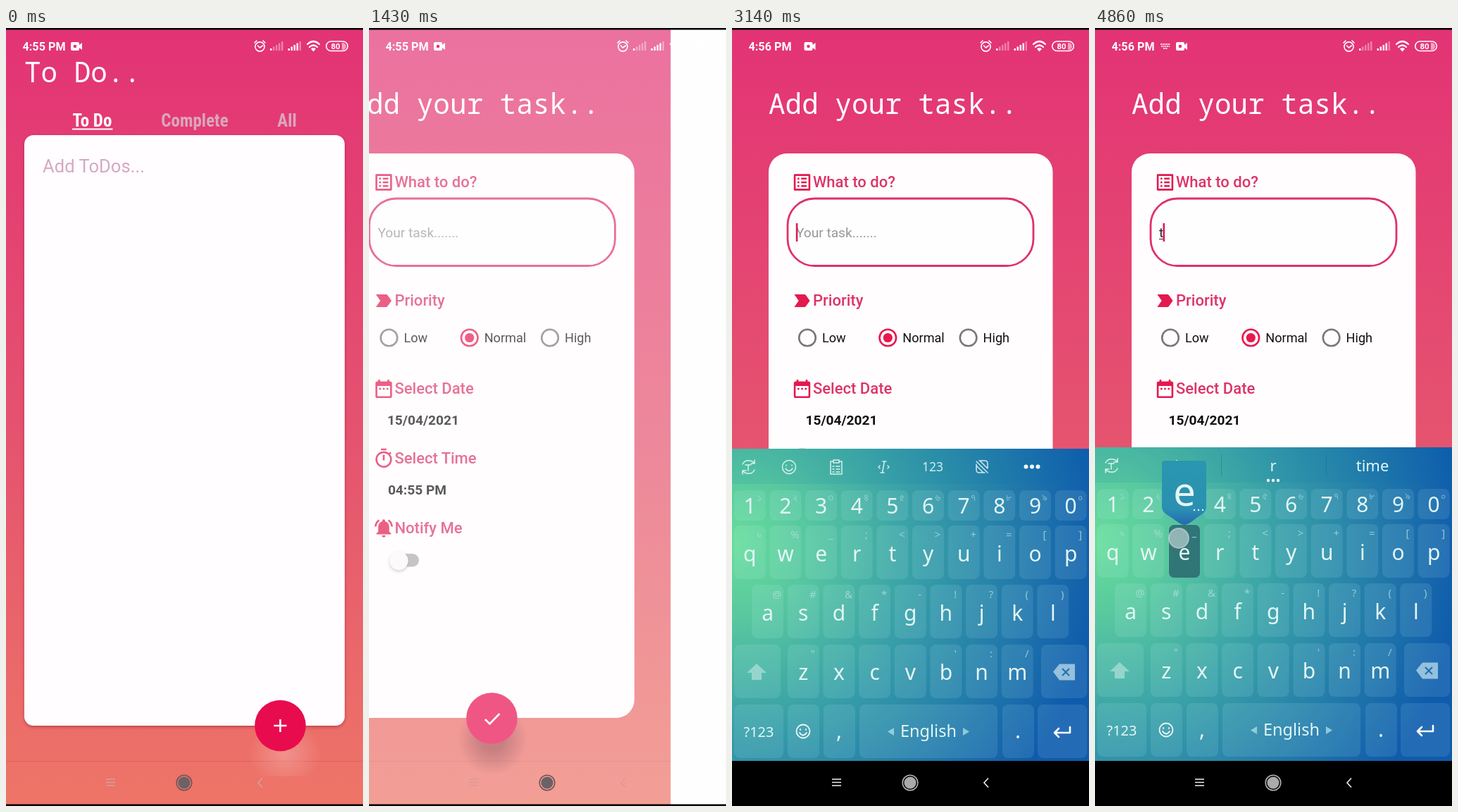
Animation, 507 px wide and 1104 px high, one loop 5.01 s. Source, as an HTML page:

```html
<!DOCTYPE html>
<html lang="en">
<head>
<meta charset="utf-8">
<title>To-do app</title>
<style>
html, body { margin: 0; width: 100%; height: 100%; overflow: hidden; background: #000; }
svg { display: block; width: 100vw; height: 100vh; font-family: Roboto, sans-serif; }
text { white-space: pre; }
.mid { text-anchor: middle; }
.title { font: 39.3px "Noto Sans Mono", monospace; fill: #fff; }
.tab { font: 700 25px "Roboto Condensed", Roboto, sans-serif; font-stretch: 75%; text-anchor: middle; fill: #d9a6bd; }
.label { font-size: 22px; font-weight: 500; fill: #dc3468; }
.value { font-size: 19.1px; font-weight: 700; fill: #111; }
.option { font-size: 18.1px; fill: #111; }
.hint { font-size: 19.1px; }
.status { fill: #fff; stroke: none; }
.line { fill: none; stroke: #fff; stroke-linecap: round; stroke-linejoin: round; }
.kb text { font-family: "Noto Sans", sans-serif; fill: #e3f6f5; }
.kb .cap { font-size: 30px; text-anchor: middle; }
.kb .alt { font-size: 15px; text-anchor: middle; fill: #b5e2df; opacity: .75; }
.kb .word { font-size: 22px; text-anchor: middle; }
</style>
</head>
<body>
<svg viewBox="0 0 507 1104" preserveAspectRatio="none">
  <defs>
    <linearGradient id="sky" x2="0" y2="1">
      <stop stop-color="#e33375"/><stop offset=".54" stop-color="#e5546f"/><stop offset="1" stop-color="#ee7567"/>
    </linearGradient>
    <radialGradient id="sea" gradientUnits="userSpaceOnUse" cx="0" cy="730" r="525">
      <stop stop-color="#68dd9b"/><stop offset=".2" stop-color="#58c89f"/>
      <stop offset=".5" stop-color="#389fa8"/><stop offset="1" stop-color="#0f5bac"/>
    </radialGradient>
    <linearGradient id="bubble" x2="0" y2="1">
      <stop stop-color="#2a97af"/><stop offset=".75" stop-color="#2a90b2"/><stop offset="1" stop-color="#2569ae"/>
    </linearGradient>
    <radialGradient id="glow"><stop stop-color="#fff" stop-opacity=".24"/><stop offset="1" stop-color="#fff" stop-opacity="0"/></radialGradient>
    <radialGradient id="shade"><stop offset=".3" stop-color="#5a1024" stop-opacity=".42"/><stop offset="1" stop-color="#5a1024" stop-opacity="0"/></radialGradient>
    <filter id="soft" x="-50%" y="-50%" width="200%" height="200%"><feGaussianBlur stdDeviation="2"/></filter>
    <clipPath id="aboveNav"><rect width="507" height="1062"/></clipPath>
    <g id="back">
      <rect width="507" height="1104" fill="url(#sky)"/>
      <path d="M0 1040.5H507" stroke="#b0404f" stroke-opacity=".3"/>
    </g>
    <path id="camera" d="M2 20h8q2 0 2 2v2l4-3v10l-4-3v2q0 2-2 2H2q-2 0-2-2v-8q0-2 2-2z"/>
  </defs>

  <rect width="507" height="1104" fill="#fffefe"/>

  <g id="list">
    <use href="#back"/>
    <text class="title" x="26" y="77">To Do..</text>
    <text class="tab" x="122.5" y="140" style="fill:#fff">To Do</text>
    <path d="M94 143.5H151.500" stroke="#fff" stroke-width="2"/>
    <text class="tab" x="268" y="140">Complete</text>
    <text class="tab" x="399" y="140">All</text>
    <rect x="26" y="154" width="455" height="838" rx="13" fill="#8a2038" opacity=".5" filter="url(#soft)"/>
    <rect x="26" y="152" width="455" height="838" rx="13" fill="#fffdff"/>
    <text x="52" y="205" font-size="25.6" fill="#d5a9c0">Add ToDos...</text>
    <ellipse cx="396" cy="1030" rx="52" ry="48" fill="url(#glow)" clip-path="url(#aboveNav)"/>
    <circle id="add" cx="389.500" cy="990" r="36.300"/>
    <path d="M380.500 990h18M389.500 981v18" stroke="#fff" stroke-width="2.600"/>
  </g>

  <g id="form">
    <use href="#back"/>
    <text class="title" x="52" y="122">Add your task..</text>
    <rect x="52" y="178" width="403.500" height="801" rx="26" fill="#fffdfe"/>
    <g id="sections"></g>
    <rect x="79" y="242" width="349" height="95.500" rx="38" fill="#fffefe" stroke="#df3168" stroke-width="2.800"/>
    <text id="entry" class="hint" x="91" y="297"></text>
    <path id="under" d="M91 299.500h6" stroke="#222"/>
    <rect id="caret" y="277" width="2.600" height="26" fill="#d81f56"/>
    <g id="options"></g>
    <text class="value" x="104.500" y="563">15/04/2021</text>
    <text class="value" x="105.500" y="662">04:55 PM</text>
    <rect x="111" y="746" width="38.500" height="18.500" rx="9.200" fill="#b0abad"/>
    <circle cx="121" cy="758" r="13" fill="#777" opacity=".5" filter="url(#soft)"/>
    <circle cx="121" cy="756" r="13.200" fill="#fdf9fb"/>
    <ellipse cx="254" cy="1010" rx="50" ry="50" fill="url(#shade)"/>
    <circle cx="253" cy="979.500" r="36.300" fill="#e80c4e"/>
    <path class="line" d="M243.500 981l6.500 6.500L264 973" stroke-width="2.600" style="stroke-linecap:butt;stroke-linejoin:miter"/>
  </g>

  <g id="board" class="kb"></g>

  <g class="status">
    <text id="clock" x="23.500" y="31.500" font-size="16.200" font-weight="600"></text>
    <path id="keysIcon" d="M93 23h14M94 26h12M97 29h6" stroke="#fff" stroke-width="2" stroke-dasharray="2 .7" opacity=".8"/>
    <g id="rec"><use href="#camera"/><circle cx="6" cy="26" r="2.300" fill="#e33375"/></g>
    <g class="line" stroke-width="1.600">
      <circle cx="360.500" cy="26.500" r="6.600"/>
      <path d="M357.500 25l3 3 4-3M353 21l3-3M368 21l-3-3"/>
      <rect x="454.800" y="19" width="30.500" height="13.500" rx="6.700"/>
      <path d="M428 23q8.500-8 17 0M431 27q5.500-5 11 0" stroke-width="2.200"/>
    </g>
    <path d="M433 29.500q3.500-3 7 0l-3.500 4z"/>
    <path d="M477 21h2q4 1 4 5t-4 5h-2z" opacity=".55"/>
    <text class="mid" x="468" y="30" font-size="11.500" font-weight="700">80</text>
    <g id="signal"></g>
  </g>

  <g id="nav">
    <rect id="navBack" y="1040" width="507" height="64"/>
    <path id="menu" d="M142 1066h13M142 1070.500h13M142 1075h13" stroke-width="1.500"/>
    <circle id="ring" cx="253" cy="1071" r="10.800" fill="none" stroke-width="1.500"/>
    <circle id="home" cx="253" cy="1071" r="8.600"/>
    <path id="prev" d="M364 1064.500l-6 6.500 6 6.500" fill="none" stroke-width="1.600"/>
  </g>
  <path d="M0 1.300H507M0 1102.700H507" stroke="#000" stroke-width="2.600"/>
  <circle id="touch" r="14" fill="#fff" fill-opacity=".46" stroke="#d9d4e4" stroke-opacity=".6" stroke-width="2"/>
</svg>

<script>
const $ = id => document.getElementById(id);
const show = (id, on) => $(id).style.display = on ? '' : 'none';
const attr = (id, map) => { for (const k in map) $(id).setAttribute(k, map[k]); };
const text = (cls, x, y, s, extra = '') => `<text class="${cls}" x="${x}" y="${y}" ${extra}>${s.replace(/&/g, '&amp;').replace(/</g, '&lt;')}</text>`;

// Form headings with 24-unit icons
const sections = [
  ['What to do?', 219, 'M19 5v14H5V5h14m1-2H4q-1 0-1 1v16q0 1 1 1h16q1 0 1-1V4q0-1-1-1zM11 7h6v2h-6zm0 4h6v2h-6zm0 4h6v2h-6zM7 7h2v2H7zm0 4h2v2H7zm0 4h2v2H7z'],
  ['Priority', 387, 'M3.500 19h11q1 0 1.600-.8L20.500 12 16.100 5.800Q15.500 5 14.500 5h-11l4.800 7z'],
  ['Select Date', 512, 'M9 11H7v2h2zm4 0h-2v2h2zm4 0h-2v2h2zm2-7h-1V2h-2v2H8V2H6v2H5q-2 0-2 2v14q0 2 2 2h14q2 0 2-2V6q0-2-2-2zm0 16H5V9h14z'],
  ['Select Time', 611, 'M15 1H9v2h6zm-4 13h2V8h-2zm8-6.600L20.500 6 19 4.600 17.600 6A9 9 0 1 0 19 7.400zM12 20a7 7 0 1 1 0-14 7 7 0 0 1 0 14z'],
  ['Notify Me', 709.500, 'M7.600 4.100L6.200 2.700Q2.300 5.700 2 10.500h2q.3-4 3.600-6.400zM20 10.500h2q-.3-4.800-4.200-7.800l-1.400 1.400q3.300 2.400 3.600 6.400zM18 11q0-5-4.500-6.300V4a1.500 1.500 0 0 0-3 0v.7Q6 6 6 11v5l-2 2v1h16v-1l-2-2zM12 22q2 0 2-2h-4q0 2 2 2z']
];
$('sections').innerHTML = sections.map(([name, y, d]) =>
  `<path transform="translate(83.900 ${y - 15.600}) scale(1.300)" d="${d}" fill="#e3194f" fill-rule="evenodd"/>` +
  text('label', 115, y + 7.400, name)).join('');

$('options').innerHTML = ['Low', 'Normal', 'High'].map((name, i) => {
  const x = 107 + i * 114.300, on = i === 1;
  return `<circle cx="${x}" cy="439.500" r="11.800" fill="none" stroke="${on ? '#e8174f' : '#7c757a'}" stroke-width="2.600"/>` +
    (on ? `<circle cx="${x}" cy="439.500" r="6.600" fill="#e8174f"/>` : '') + text('option', x + 21, 446, name);
}).join('');

$('signal').innerHTML = [[375, 1], [400.500, 4]].map(([x, lit]) => [0, 1, 2, 3, 4].map(i =>
  `<rect x="${x + i * 4}" y="${29 - i * 2.500}" width="2.500" height="${3 + i * 2.500}" opacity="${i < lit ? .95 : .38}"/>`).join('')).join('');

// Keyboard
const PITCH = 50.650;
const key = (x, y, w, h = 76) => `<rect x="${x}" y="${y}" width="${w}" height="${h}" rx="8" fill="#d8fbff" fill-opacity=".1"/>`;
const row = (keys, alts, x0, top, h, base, altBase) => [...keys].map((c, i) => {
  const x = x0 + i * PITCH, a = alts[i];
  return key(x - 22.500, top, 45, h) + text('cap', x, base, c) +
    (a && a !== ' ' ? text('alt', x + 13.500, altBase, a) : '');
}).join('');
const smile = (x, y, r) => `<circle cx="${x}" cy="${y}" r="${r}"/><path d="M${x - 4} ${y - 3}v1M${x + 4} ${y - 3}v1M${x - 5} ${y + 2}q5 7 10 0"/>`;
const dots = (x, y, r, gap) => [-1, 0, 1].map(i => `<circle cx="${x + i * gap}" cy="${y}" r="${r}" fill="#eefafa"/>`).join('');

$('board').innerHTML = `
  <rect y="595" width="507" height="447" fill="url(#sea)"/>
  <rect y="595" width="507" height="50" fill="#0870a8" opacity=".1"/>
  <g class="line" stroke-width="1.500" opacity=".8">
    <path d="M15 617q4-8 14-4l3 3m0-5v5h-5M32 625q-4 8-14 4l-3-3m0 5v-5h5M19 618h8m-4 0v8"/></g>
  <g id="tools"><g class="line" stroke-width="1.500" opacity=".8">
    ${smile(81, 621, 9.500)}
    <path d="M144 613h-4v18h16v-18h-4m-8-2h8v4h-8zM143 620h2m3 0h5m-10 4h2m3 0h5m-10 4h2m3 0h5"/>
    <path d="M214 613h5m-2.500 0l-3 16m-2.500 0h5M210 619l-2 2 2 2M221 619l2 2-2 2"/>
    <path d="M347 613l16 16M351 612h8q4 0 4 4v7M347 617v8q0 4 4 4h8M352 612l11 11M347 619l10 10"/></g>
    ${text('mid', 285, 627, '123', 'font-size="17.500" opacity=".9"')}${dots(426, 620.500, 3, 8.500)}</g>
  <g id="words">
    <path d="M179.500 605v31M328.500 605v31" stroke="#12627f" stroke-opacity=".35"/>
    ${text('word', 122, 629, 'the')}${text('word', 253, 629, 'r')}${text('word', 394, 629, 'time')}${dots(253, 642, 2.200, 7)}</g>
  ${row('1234567890', '১২৩৪৫৬৭৮৯০', 25.300, 654, 43, 687, 669)}
  ${row('qwertyuiop', '৳%_;<>+=[]', 25.300, 704, 76, 755, 722)}
  ${row('asdfghjkl', '@#&*-!?()', 50.600, 788, 76, 839, 807)}
  ${row('zxcvbnm', '"   \':/', 101.300, 873, 76, 923, 891)}
  ${key(3, 873, 66)}${key(439, 873, 65)}${key(3, 958, 70)}${key(79, 958, 45)}${key(130, 958, 45)}
  ${key(181, 958, 196)}${key(384, 958, 45)}${key(434, 958, 70)}
  <path d="M35 900l14 13h-7v10H28v-10h-7z" fill="#a5dcd4" opacity=".8"/>
  <path d="M456 911.500l9-11h22v23h-22z" fill="#a9cfe4" opacity=".85"/>
  <path d="M469 907l10 10m0-10l-10 10" stroke="#2173ae" stroke-width="2.200"/>
  ${text('mid', 38, 1004, '?123', 'font-size="20"')}
  <g class="line" stroke-width="1.800" opacity=".9">${smile(101, 996, 9.500)}</g>
  ${text('cap', 152, 1006, ',')}${text('cap', 406, 1006, '.')}
  ${text('mid', 279, 1004, 'English', 'font-size="23.500" font-weight="500"')}
  <path d="M230 991v11l-9-5.500zM328 991v11l9-5.500z" fill="#a9dbe0" opacity=".8"/>
  <path class="line" d="M480 990v8h-22m6-6l-6 6 6 6" stroke-width="2.600"/>
  <g id="press">
    <rect x="-22" y="705" width="44" height="75" rx="7" fill="#27646c" opacity=".82"/>
    <text id="pressCap" class="cap" x="0" y="755"></text>${text('alt', 14, 727, '–')}
    <path d="M-32 618q0-4 4-4h55q4 0 4 4v62q0 5-5 9l-18 13q-8 6-16 0l-19-13q-5-4-5-9z" fill="url(#bubble)"/>
    <text id="pressBig" class="mid" x="0" y="678" font-size="56"></text>${dots(20, 684, 1.200, 6)}
  </g>`;

const steps = [
  { at: 0, press: 0, slide: 0, touch: null, caret: false, hint: '#9a979a', typed: '', kb: null, clock: '4:55 PM', rec: 92, keysIcon: false, key: '' },
  { at: 1000, press: .45, touch: [373, 983] },
  { at: 1140, press: 1 },
  { at: 1290, slide: .18, touch: null },
  { at: 1430, slide: .69 },
  { at: 1570, slide: 1 },
  { at: 2860, touch: [300, 296], caret: true, hint: '#828082' },
  { at: 3000, touch: null, kb: 130, hint: '#98969a' },
  { at: 3140, kb: 2, clock: '4:56 PM', rec: 102.500 },
  { at: 3290, kb: 0, rec: 115, keysIcon: true },
  { at: 3430, caret: false },
  { at: 3860, caret: true },
  { at: 4430, caret: false, key: 't', keyX: 228, touch: [226, 735] },
  { at: 4570, caret: true, typed: 't', key: '', touch: null },
  { at: 4860, key: 'e', keyX: 127, touch: [119, 724] }
];
const LOOP = 5010;

function draw(s) {
  const p = s.slide, kb = s.kb !== null;
  show('list', p < .5);
  attr('list', { transform: `translate(${253.500 * p})`, opacity: 1 - p });
  show('form', p > 0);
  attr('form', { transform: `translate(${253.500 * (p - 1)})`, opacity: p });
  attr('add', { fill: `rgb(${232 - 56 * s.press},${12 - 2 * s.press},${78 - 13 * s.press})` });

  $('entry').textContent = s.typed || 'Your task.......';
  attr('entry', { fill: s.typed ? '#222' : s.hint });
  show('under', s.typed);
  show('caret', s.caret);
  attr('caret', { x: s.typed ? 96.500 : 90.800 });

  show('board', kb);
  attr('board', { transform: `translate(0 ${s.kb || 0})` });
  show('tools', !s.typed);
  show('words', s.typed);
  show('press', s.key);
  attr('press', { transform: `translate(${s.keyX || 0})` });
  $('pressCap').textContent = $('pressBig').textContent = s.key;

  $('clock').textContent = s.clock;
  show('keysIcon', s.keysIcon);
  attr('rec', { transform: `translate(${s.rec})` });

  const faint = p > 0 ? '#d99a98' : '#cfa0a3';
  show('navBack', kb);
  attr('menu', { stroke: kb ? '#eee' : faint });
  attr('prev', { stroke: kb ? '#eee' : faint });
  attr('ring', { stroke: kb ? '#b5b5b5' : '#6b5558' });
  attr('home', { fill: kb ? '#aaa' : '#6a6264' });

  show('touch', s.touch);
  if (s.touch) attr('touch', { cx: s.touch[0], cy: s.touch[1] });
}

const start = performance.now();
let last = -1;
function tick() {
  const t = (performance.now() - start) % LOOP;
  const n = steps.filter(s => s.at <= t).length;
  if (n !== last) draw(Object.assign({}, ...steps.slice(0, n)));
  last = n;
  requestAnimationFrame(tick);
}
tick();
</script>
</body>
</html>
```
